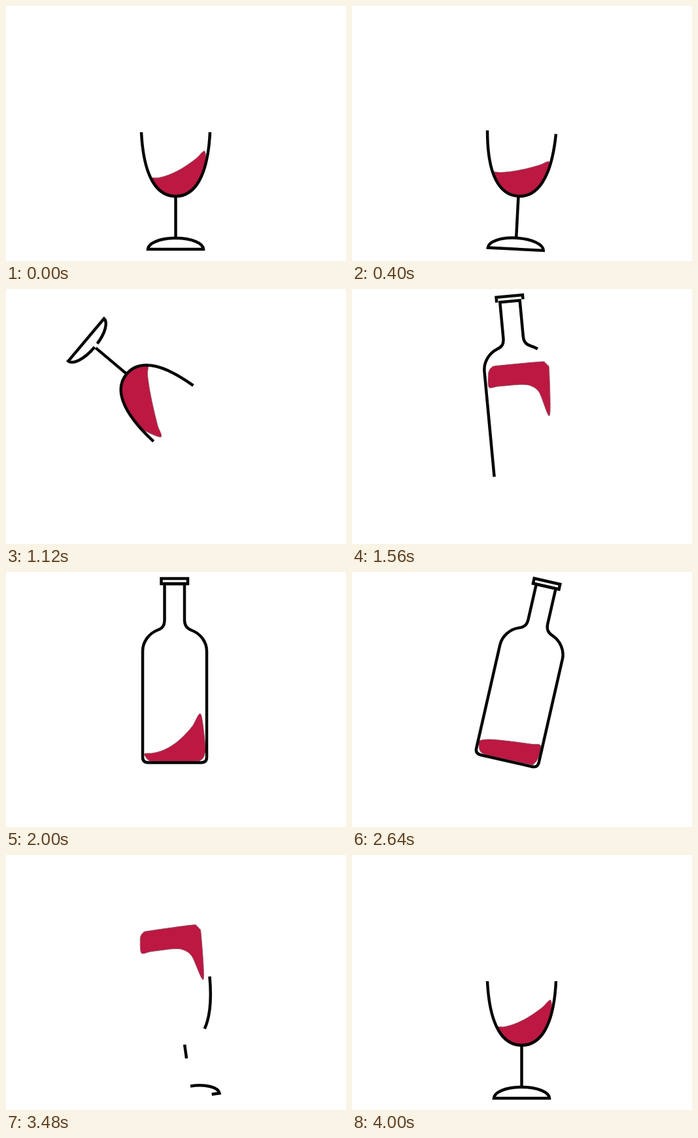
Write an HTML page that moves like this. It is 520 by 390 pixels and loops after 4020 ms.

```html
<!DOCTYPE html>
<html lang="en">
<head>
<meta charset="utf-8">
<title>Wine glass and bottle</title>
<style>
  html, body { margin: 0; width: 100%; height: 100%; overflow: hidden; background: #fff; }
  svg { display: block; width: 520px; height: 390px; }
  .line path { fill: none; stroke: #050505; stroke-width: 4.5; }
  #wine { fill: #bc1842; stroke: #8a5560; stroke-width: .8; }
</style>
</head>
<body>
<svg viewBox="0 0 520 390">
  <!-- everything is drawn around the pivot at 0,0 -->
  <g transform="translate(259.5 193)">
    <path id="wine"/>
    <g id="glass" class="line">
      <path pathLength="1" d="M52.5 0C49 70 28 98 0 98S-49 70-52.5 0"/>
      <path pathLength="1" d="M0 98V162"/>
      <path pathLength="1" d="M0 162C25 162 42 170 42.5 179H-42.5C-42 170-25 162 0 162Z"/>
    </g>
    <g id="bottle" class="line">
      <path pathLength="1" d="M-50.5 90V-72C-50.5-86-41-99-28-104C-20-107-17-111-17-120V-175H13.5V-120C13.5-111 17-107 24-104C38-99 47.5-86 47.5-72V90Q47.5 98.5 39 98.5H-42Q-50.5 98.5-50.5 90Z"/>
      <path pathLength="1" d="M-22-175V-183H18.5V-175Z"/>
    </g>
  </g>
</svg>
<script>
const LOOP = 4020, HALF = 1990, SIDE = 8;
const clamp = x => Math.min(1, Math.max(0, x));
const span = (t, a, b) => clamp((t - a) / (b - a));
const mix = (a, b, k) => a + (b - a) * k;
const mixPoint = (p, q, k) => p.map((v, i) => mix(v, q[i], k));
const list = (n, make) => Array.from({ length: n }, (_, i) => make(i));

const sine = x => (1 - Math.cos(Math.PI * x)) / 2;
const cubic = x => x < .5 ? 4 * x ** 3 : 1 - 4 * (1 - x) ** 3;

// cubic-bezier(.82, 0, .18, 1)
function swing(x) {
  let lo = 0, hi = 1;
  for (let i = 0; i < 24; i++) {
    const u = (lo + hi) / 2, v = 1 - u;
    if (3 * u * v * v * .82 + 3 * u * u * v * .18 + u ** 3 < x) lo = u; else hi = u;
  }
  return lo * lo * (3 - 2 * lo);
}

// Wine in a superellipse vessel: a curved surface, then the wall below it.
function pool({ x, width, depth, round }, left, right, power, fill = depth) {
  const wall = a => [
    x + width * Math.sign(Math.cos(a)) * Math.abs(Math.cos(a)) ** round,
    fill * Math.sin(a) ** round
  ];
  const reach = y => Math.asin(clamp(y / fill) ** (1 / round));
  const a0 = reach(right), a1 = Math.PI - reach(left);
  const blunt = Math.abs(left - right) / 8, rightHigh = right < left;
  const x0 = wall(a1)[0] + (rightHigh ? 0 : blunt);
  const x1 = wall(a0)[0] - (rightHigh ? blunt : 0);
  const low = Math.max(left, right), high = Math.min(left, right);
  const surface = list(SIDE, i => {
    const k = i / (SIDE - 1);
    return [mix(x0, x1, k), mix(low, high, (rightHigh ? k : 1 - k) ** power)];
  });
  return surface.concat(list(SIDE, i => wall(mix(a0, a1, (i + 1) / (SIDE + 1)))));
}

const bowl = { x: 0, width: 51, depth: 97, round: .88 };
const box = { x: -1.5, width: 47.5, depth: 96.5, round: .2 };
const drop = pool(box, -3, 50, 8, 82);
const glassRest = pool(bowl, 71, 29, 1.8);
const bottleRest = pool(box, 85, 24, 2.2);

// the same outline seen from the other vessel, upside down
const flip = pts => pts.map((_, i) => pts[(i + SIDE) % pts.length].map(v => -v));

const stages = [
  {
    line: document.getElementById('glass'),
    keys: [[0, glassRest], [740, pool(bowl, 58, 55, 1)], [1120, pool(bowl, 82, -4, 1.2)],
      [1490, drop], [HALF, flip(bottleRest)]]
  },
  {
    line: document.getElementById('bottle'),
    keys: [[0, bottleRest], [650, pool(box, 78, 64, .5)], [1490, drop], [HALF, flip(glassRest)]]
  }
];

function wineAt(keys, t) {
  const next = Math.max(1, keys.findIndex(key => t < key[0]));
  const i = t >= HALF ? keys.length - 1 : next;
  const [t0, from] = keys[i - 1], [t1, to] = keys[i];
  const k = span(t, t0, t1), falling = i === keys.length - 1;
  return from.map((p, j) => mixPoint(p, to[j], falling ? k * k : k));
}

function smooth(pts) {
  const n = pts.length, at = i => pts[(i + n) % n];
  const handle = (i, k) => at(i).map((v, c) => v + (at(i + 1)[c] - at(i - 1)[c]) * k);
  const fix = p => p.map(v => v.toFixed(2)).join(' ');
  const curves = pts.map((_, i) => 'C' + [handle(i, .15), handle(i + 1, -.15), at(i + 1)].map(fix).join(' '));
  return 'M' + fix(pts[0]) + curves.join('') + 'Z';
}

const wine = document.getElementById('wine');
const rotate = (node, deg) => node.setAttribute('transform', `rotate(${deg})`);

function pose(line, deg, shown) {
  rotate(line, deg);
  line.style.display = shown > .001 ? '' : 'none';
  for (const path of line.children)
    path.style.strokeDasharray = shown < 1 ? `${shown} 2` : 'none';
}

function render(time) {
  const h = time >= HALF ? 1 : 0, t = time - h * HALF;
  const deg = 180 * swing(span(t, 99, 1949));
  pose(stages[h].line, deg, 1 - cubic(span(t, 1085, 1255)));
  pose(stages[1 - h].line, deg - 180, sine(span(t, 1310, 1770)));
  wine.setAttribute('d', smooth(wineAt(stages[h].keys, t)));
  rotate(wine, deg);
}

const start = performance.now();
function tick() {
  const t = (performance.now() - start) % LOOP;
  render(Math.floor(t / 20) * 20);
  requestAnimationFrame(tick);
}
tick();
</script>
</body>
</html>
```
